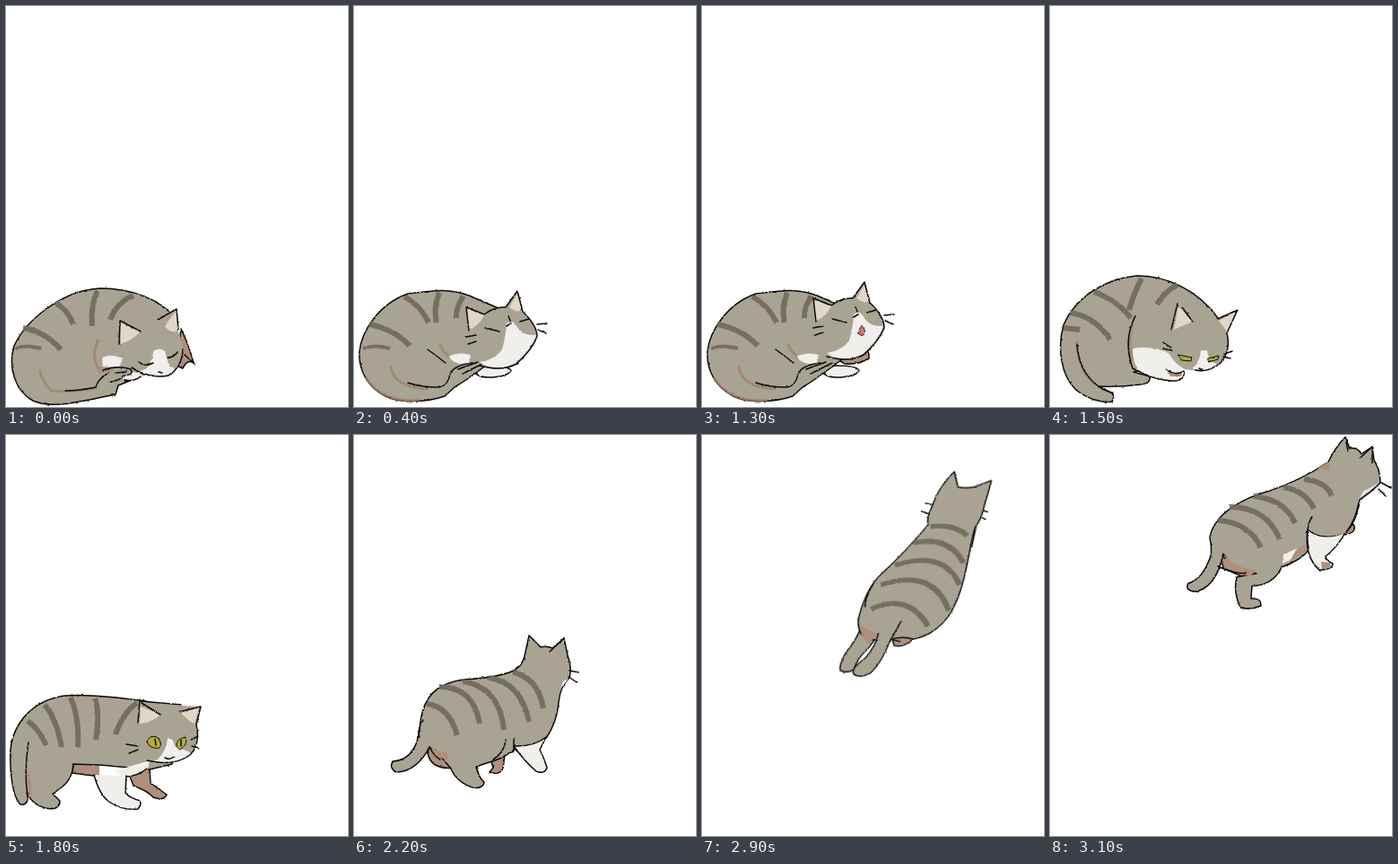
An HTML page without scripts for the animation above (3200 ms loop, 381 px wide and 446 px high).

```html
<!DOCTYPE html>
<html lang="en">
<head>
<meta charset="utf-8">
<title>Cat waking up</title>
<style>
html, body { margin: 0; width: 100%; height: 100%; overflow: hidden; background: #fff; }
svg { display: block; width: 381px; height: 446px; }
path { fill: #a9a394; stroke: #0c0b0a; stroke-width: 1.5; stroke-linejoin: round; stroke-linecap: round; }
.line { fill: none; }
.stripe { fill: none; stroke: #6f685d; stroke-width: 6; stroke-linecap: butt; opacity: .88; }
.thin { stroke-width: 4; }
.brown { fill: #ae8e7d; }
.white { fill: #f1efec; }
.ear { fill: #e2d6c8; }
.eye { fill: #b5ad38; stroke-width: 1; }
.pink { fill: #c97a6e; }
.flat { stroke: none; }
.rim { fill: none; stroke: #a07f6d; stroke-width: 3; opacity: .75; }

/* one drawing every 100 ms = 3.125% */
.pose, .part { animation: 3.2s step-end infinite; }
.pose { visibility: hidden; }
#sleep { animation-name: sleep; transform-origin: 100px 444px; }
#yawn { animation-name: yawn; }
#yawnHead { animation-name: lift; }
#mouth { animation-name: open; transform-origin: 178px 348px; }
#rise { animation-name: rise; transform-origin: 100px 441px; }
#stand { animation-name: stand; transform-origin: 110px 416px; }
#turn { animation-name: turn; }
#away { animation-name: away; transform-origin: 193px 237px; }
#leave { animation-name: leave; transform-origin: 152px 0; }

@keyframes sleep {
  0% { visibility: visible; transform: none; }
  3.125% { transform: scaleY(1.01); }
  6.25% { transform: scaleY(1.02); }
  9.375%, 100% { visibility: hidden; }
}
@keyframes yawn {
  0% { visibility: hidden; }
  9.375% { visibility: visible; }
  43.75%, 100% { visibility: hidden; }
}
@keyframes lift {
  0%, 9.375% { transform: translate(2px, 23px); }
  12.5% { transform: translate(1px, 19px); }
  15.625% { transform: translateY(14px); }
  18.75% { transform: translateY(9px); }
  21.875% { transform: translateY(4px); }
  25% { transform: none; }
  40.625%, 100% { transform: translateY(9px); }
}
@keyframes open {
  0% { transform: scale(0); }
  15.625% { transform: scale(.3); }
  18.75% { transform: scale(.55); }
  21.875% { transform: scale(.8); }
  25% { transform: none; }
  40.625%, 100% { transform: scale(.5); }
}
@keyframes rise {
  0% { visibility: hidden; }
  43.75% { visibility: visible; transform: translateX(-4px) scaleY(.96); }
  46.875% { transform: none; }
  50% { transform: translate(-3px, -4px) scaleY(1.01); }
  53.125%, 100% { visibility: hidden; }
}
@keyframes stand {
  0% { visibility: hidden; }
  53.125% { visibility: visible; transform: translate(1px, 8px) scaleY(.96); }
  56.25% { transform: none; }
  59.375% { transform: translate(-4px, 1px); }
  62.5% { transform: translate(4px, -12px) scaleX(.97); }
  65.625%, 100% { visibility: hidden; }
}
@keyframes turn {
  0% { visibility: hidden; }
  65.625% { visibility: visible; transform: translate(-24px, 25px); }
  68.75% { transform: none; }
  71.875% { transform: translate(3px, -26px); }
  75%, 100% { visibility: hidden; }
}
@keyframes away {
  0% { visibility: hidden; }
  75% { visibility: visible; transform: translate(-17px, 44px) skewX(-5deg) scaleY(.87); }
  78.125% { transform: translate(-8px, 21px) skewX(-2deg) scaleY(.94); }
  81.25% { transform: none; }
  84.375% { transform: translate(13px, -25px) skewX(-3deg); }
  87.5% { transform: translate(28px, -52px) skewX(-6deg) scaleY(.97); }
  90.625% { transform: translate(45px, -82px) skewX(-10deg) scaleY(.9); }
  93.75%, 100% { visibility: hidden; }
}
@keyframes leave {
  0% { visibility: hidden; }
  93.75% { visibility: visible; transform: translateY(19px) scale(.84, 1.07); }
  96.875%, 100% { visibility: visible; transform: none; }
}
</style>
</head>
<body>
<svg viewBox="0 0 381 446">
<defs>
  <filter id="ink" filterUnits="userSpaceOnUse" x="0" y="0" width="381" height="446" color-interpolation-filters="sRGB">
    <feTurbulence type="fractalNoise" baseFrequency=".3" numOctaves="2" seed="4"/>
    <feDisplacementMap in="SourceGraphic" scale="2.2" xChannelSelector="R" yChannelSelector="G"/>
  </filter>
</defs>
<g filter="url(#ink)">

<g id="sleep" class="pose">
  <path class="brown" d="M195 359Q203 375 209 397Q202 392 197 403L190 400Z"/>
  <path d="M188 347C172 326 140 314 105 314C62 316 22 350 9 378C2 402 10 428 30 439C50 448 80 441 122 432L125 422Q135 418 150 412L185 390Z"/>
  <path class="stripe thin" d="M10 381Q24 376 39 381"/>
  <path class="stripe" d="M19 358Q43 362 61 382M55 330Q69 338 75 354M102 317Q94 332 96 356M142 322Q124 329 116 349"/>
  <path class="rim" d="M38 406Q41 420 51 428Q76 429 100 425M103 372Q93 389 105 407"/>
  <path class="white flat" d="M107 391Q118 386 130 392L126 402L108 402Z"/>
  <path class="brown flat" d="M104 401L123 402L116 407L103 408Z"/>
  <path class="line" d="M66 428Q82 428 100 424Q104 410 124 405"/>
  <path class="white flat" d="M128 414L142 407L154 411Q148 418 136 416Z"/>
  <path class="flat" d="M112 410Q125 399 139 404Q143 410 132 411Q126 417 116 418"/>
  <path class="line" d="M108 405Q125 399 139 404Q143 410 132 411Q126 417 116 418M122 408L134 407M132 416Q143 418 150 412"/>
  <path class="flat" d="M127 350L126 376Q132 397 148 407Q166 414 181 411Q194 403 197 386Q196 371 191 360L190 338L169 348L150 362Z"/>
  <path class="ear flat" d="M127 350L150 362Q140 372 128 376ZM177 356L190 338L192 361Q183 365 177 356Z"/>
  <path class="white flat" d="M164 384Q171 379 177 384L182 401Q188 401 188 406Q180 412 168 412Q156 411 149 406Q163 404 164 384Z"/>
  <path class="line" d="M126 376L127 350L150 362M169 349L190 337L192 360M140 402L148 407Q166 414 181 411Q196 402 197 382M148 396Q155 402 164 397M180 391Q187 391 191 385M170 407L174 408M199 388L210 398"/>
</g>

<g id="yawn" class="pose">
  <path class="white" d="M134 407Q138 400 150 400Q174 400 175 406Q169 413 150 413Q138 413 134 407Z"/>
  <path class="brown" d="M143 388L176 379Q187 380 186 392Q175 399 159 398Z"/>
  <path d="M128 322C105 313 85 317 60 320C28 331 8 362 6 385C5 405 15 424 35 434C50 442 80 441 101 434L112 424Q127 415 144 402L160 390L170 340Z"/>
  <path class="stripe thin" d="M10 381Q24 376 40 381"/>
  <path class="stripe" d="M17 354Q46 360 62 378M56 323Q75 334 83 352M95 319Q88 335 92 352M122 323Q114 333 114 347"/>
  <path class="rim" d="M41 402Q45 424 81 426M96 377Q102 390 114 395M14 414Q24 431 44 436Q58 440 72 438"/>
  <path class="white flat" d="M105 390Q116 384 130 388L128 397Q114 401 105 390Z"/>
  <path class="line" d="M60 419Q74 424 95 424Q105 422 107 409Q112 399 132 397M82 382Q92 389 102 397M116 404L138 396M121 409L145 397"/>
  <g id="yawnHead" class="part">
    <path class="flat" d="M122 352L124 316L144 324Q156 315 168 316L181 298L187 321Q203 336 203 349Q197 364 180 379Q164 388 145 382Q128 372 122 352Z"/>
    <path class="ear flat" d="M125 318L144 325Q138 337 127 341ZM172 316L181 301L186 319Q180 323 172 316Z"/>
    <path class="white flat" d="M169 334Q175 329 180 337Q186 348 202 347Q197 362 179 378Q163 387 145 381L139 377Q157 374 164 363Q168 350 169 334Z"/>
    <path class="line" d="M127 342L124 316L144 324Q156 315 168 316L181 298L187 321Q203 336 203 349Q197 364 180 379Q164 388 139 381M145 339L161 343M184 332L194 329M169 337L174 334M171 326L173 331M124 349L135 347M126 357L135 354M203 335L214 334M204 341L213 345"/>
    <path id="mouth" class="part pink" d="M178 345Q171 350 171 363Q178 371 185 363Q186 351 178 345Z"/>
  </g>
</g>

<g id="rise" class="pose">
  <path d="M187 347C165 316 130 300 97 300C60 303 28 325 15 355C8 380 12 411 29 427C42 437 58 442 69 440Q74 432 66 429L54 423Q78 424 100 421Q113 420 111 412L93 407L160 390Z"/>
  <path class="stripe" d="M15 358L33 360M23 341Q51 346 67 371M49 318Q76 328 90 347M102 303Q94 318 88 338M142 310Q128 317 119 332"/>
  <path class="rim" d="M30 374Q31 404 49 420M95 345Q86 365 91 393"/>
  <path class="white flat" d="M92 381Q110 377 132 386L150 405Q151 417 137 417Q112 412 100 407Q92 397 92 381Z"/>
  <path class="brown flat" d="M130 406Q140 411 148 406L146 412L134 412Z"/>
  <path class="line" d="M30 376Q32 407 54 423Q62 429 70 430M95 345Q81 371 92 403L111 412Q127 417 140 417Q151 415 149 406Q140 412 129 404"/>
  <path class="flat" d="M129 374L136 360L142 331L160 350L186 348L209 338L197 364Q201 383 190 397Q173 409 150 404Q132 394 129 374Z"/>
  <path class="ear flat" d="M143 334L159 351L138 360ZM188 350L207 340L197 362Z"/>
  <path class="white flat" d="M168 383L175 383Q177 397 186 398Q174 408 158 403Q167 398 168 383Z"/>
  <path class="line" d="M135 360L142 331M147 335L159 351M187 348L209 338L197 364Q202 383 190 397Q177 408 162 405M126 374L135 380M126 381L136 383M194 387L203 384M193 390L201 392M166 403L172 405"/>
  <path class="eye" d="M143 388L158 391L157 395L147 394ZM176 392L188 389L187 393L177 396Z"/>
</g>

<g id="stand" class="pose">
  <path class="brown" d="M137 377L142 390Q158 396 164 403Q177 407 179 400Q168 392 161 387L160 370Z"/>
  <path class="brown flat" d="M72 362H104V379L74 376Z"/>
  <path d="M155 296C120 291 90 288 65 290C30 295 8 320 5 350C4 375 7 402 16 411Q26 412 24 399Q29 411 44 415Q60 418 60 407Q55 402 52 399C62 392 74 386 75 366L105 367L160 372L185 366L205 310Z"/>
  <path class="brown flat" d="M24 372Q30 388 28 402L25 403Z"/>
  <path class="stripe" d="M24 318Q36 326 45 345M43 300Q56 315 62 347M72 292Q82 315 80 347M99 293Q105 310 100 339M146 298Q130 309 122 333"/>
  <path class="white flat" d="M120 374L160 362L158 372L132 381Z"/>
  <path class="white" d="M98 378Q104 400 115 408Q130 418 147 416Q153 409 147 406Q137 403 133 398L134 379"/>
  <path class="line" d="M25 342Q20 375 24 402M75 366L74 376L98 379M134 380Q146 380 157 371"/>
  <path class="flat" d="M146 340L148 320L149 296L195 301L217 302L212 322Q217 343 205 356Q187 369 162 364Q147 355 146 340Z"/>
  <path class="ear flat" d="M150 302L172 311Q163 320 149 321ZM195 308L215 304L210 321Q202 318 195 308Z"/>
  <path class="white flat" d="M180 338Q186 336 188 346Q199 350 206 354Q190 368 164 363Q177 358 180 338Z"/>
  <path class="line" d="M147 320L149 294M151 298L172 311M150 296L195 300M193 308L217 302L212 322Q217 343 205 356Q187 369 157 362M134 344L147 346M137 354L147 350M206 339L214 335M207 346L215 348M177 359Q182 362 187 358"/>
  <path class="eye" d="M157 341Q160 333 168 336Q175 342 171 348Q160 350 157 341ZM190 346Q189 338 200 336Q203 345 194 350Z"/>
  <path class="line" d="M166 338L167 345M195 339L195 346"/>
</g>

<g id="turn" class="pose">
  <path class="brown" d="M152 360L155 370L151 375Q162 379 166 371L168 355L178 352V338Z"/>
  <path class="brown" d="M84 346Q79 357 89 366Q99 372 110 370L105 350Z"/>
  <path d="M190 246L195 223L208 236Q214 234 221 237L234 226L238 245Q243 260 240 270Q230 279 228 297C226 320 217 335 207 346L178 350C165 361 155 362 136 369Q139 381 145 386Q144 394 132 392Q114 386 108 371L92 352L84 347C76 364 62 375 47 375Q39 371 43 363Q58 362 66 350Q73 338 74 318C78 291 92 276 122 272Q160 270 178 262Q188 256 190 246Z"/>
  <path class="white" d="M178 346Q200 347 214 336L207 350Q212 360 215 370Q212 378 203 374Q190 363 178 346Z"/>
  <path class="white flat" d="M239 271L230 282L233 274Z"/>
  <path class="brown flat" d="M82 341Q89 354 104 353L106 361Q92 362 82 341Z"/>
  <path class="stripe" d="M81 299Q106 302 115 334M95 280Q133 280 140 321M121 274Q162 280 167 328M150 270Q186 275 195 319M177 264Q205 270 211 304"/>
  <path class="line" d="M77 317Q70 328 73 336M84 347Q89 357 96 361M155 361Q168 353 169 339M178 337L178 350M218 241L234 226M240 262L250 264M239 269L248 275"/>
</g>

<g id="away" class="pose">
  <path class="brown" d="M178 312L183 325Q194 328 203 317L195 300Z"/>
  <path d="M142 304Q140 318 131 333Q125 348 128 356Q137 360 143 354Q144 341 155 328L165 308Z"/>
  <path d="M198 153Q201 129 216 110L223 129Q232 131 241 129L259 121Q258 137 256 152Q256 168 250 179C247 205 251 243 243 273C237 301 219 314 203 317Q192 313 178 317L152 318Q138 308 138 291C140 262 147 245 156 235Q178 208 197 176Q194 166 198 153Z"/>
  <path class="brown flat" d="M140 298Q152 307 163 310L154 323L146 315Z"/>
  <path class="stripe" d="M200 178Q225 174 243 189M184 198Q223 189 244 223M168 226Q220 206 244 250M156 250Q212 229 237 282M150 280Q188 259 217 301"/>
  <path class="flat" d="M186 295Q170 300 162 312L160 326L179 321Z"/>
  <path d="M163 310Q163 325 153 341Q140 352 143 360Q152 367 163 358Q173 344 177 321L186 295"/>
  <path class="line" d="M148 248Q141 266 143 277M251 178L250 203M190 149L198 151M187 159L195 162M256 158L261 160M256 167L260 169M178 317L189 320"/>
</g>

<g id="leave" class="pose">
  <path class="brown" d="M328 108L334 97Q342 101 338 107Q333 111 326 111Z"/>
  <path class="brown" d="M190 135L193 148L215 158L232 150Z"/>
  <path d="M310 30Q317 15 329 2L334 15Q342 13 347 21L359 13L361 28Q368 39 368 53Q360 62 345 72Q342 96 330 108L288 128Q280 139 258 147Q249 167 225 168L224 182Q236 181 235 190Q224 195 212 192Q204 175 208 158L230 154Q206 152 193 132C188 158 175 174 160 174Q150 172 154 165Q168 161 176 142Q182 132 178 114C183 87 215 70 245 62Q280 50 310 30Z"/>
  <path class="brown flat" d="M194 133Q208 150 231 150L223 157Q201 155 194 133ZM260 134L285 122V131L259 145ZM298 37L312 29L311 39Z"/>
  <path class="white flat" d="M260 133L275 126L268 139L259 143ZM367 53L345 70L349 63Z"/>
  <path class="white" d="M287 105Q303 119 329 108Q321 124 307 135Q307 139 315 143Q315 150 300 150Q283 135 287 105Z"/>
  <path class="brown flat" d="M302 141L313 142L313 148L303 149Z"/>
  <path class="flat" d="M286 103Q300 118 329 109L341 90L320 80Z"/>
  <path class="stripe" d="M187 95Q221 97 235 125M200 80Q241 80 256 116M227 68Q262 72 273 98M260 58Q285 62 294 82M283 49Q308 52 314 68"/>
  <path class="line" d="M292 91Q284 103 288 126M187 146Q203 154 218 154M330 8L332 18M346 25L359 13L359 31M330 108Q340 96 344 75M369 53L380 59M366 60L374 68"/>
</g>

</g>
</svg>
</body>
</html>
```
